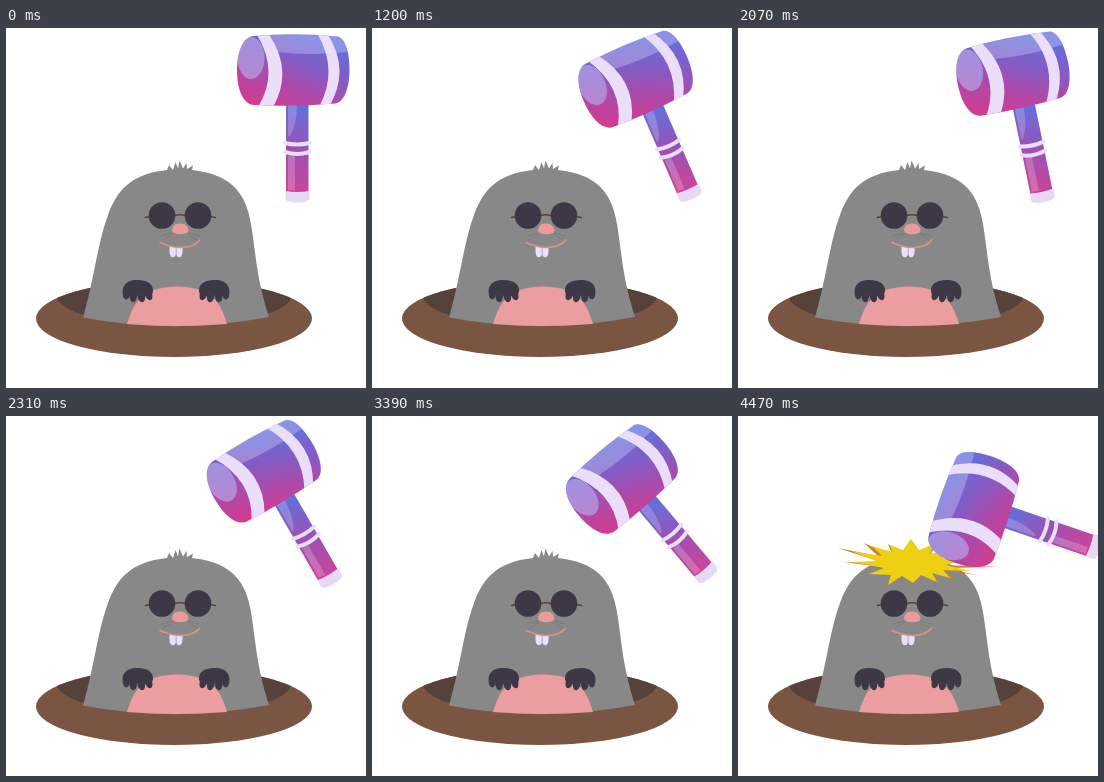
Recreate the animation shown at these times as an HTML page. Size 360 px wide and 360 px high, loop 4.5 s.

```html
<!DOCTYPE html>
<html lang="en">
<head>
<meta charset="utf-8">
<title>Mole and hammer</title>
<style>
  html, body { margin: 0; width: 100%; height: 100%; overflow: hidden; background: #fff; }
  svg { display: block; width: 100vw; height: 100vh; }
  .line { fill: none; stroke-linecap: round; }
</style>
</head>
<body>
<svg viewBox="0 0 360 360">
  <defs>
    <linearGradient id="headTint" gradientUnits="userSpaceOnUse" x1="268" y1="82" x2="298" y2="6">
      <stop offset="0" stop-color="#d03c90"/>
      <stop offset=".3" stop-color="#b248a6"/>
      <stop offset=".65" stop-color="#855bc4"/>
      <stop offset="1" stop-color="#636fdc"/>
    </linearGradient>
    <linearGradient id="gripTint" gradientUnits="userSpaceOnUse" x1="278" y1="160" x2="304" y2="80">
      <stop offset="0" stop-color="#cc4498"/>
      <stop offset=".5" stop-color="#9a52b5"/>
      <stop offset="1" stop-color="#6270dc"/>
    </linearGradient>
    <clipPath id="rim"><ellipse cx="168" cy="290.5" rx="138" ry="38.5"/></clipPath>
    <clipPath id="barrel">
      <path id="barrelShape" d="M247 8 Q290 4.500 332 8.500 C340 11 343.500 26 343.500 42 C343.500 58 339 74 329 75.500 Q288 79 247 77 C236 75 231 60 231 42 C231 25 236 10 247 8Z"/>
    </clipPath>
    <g id="paw" fill="#3d3845">
      <path d="M-15 1 C-14 -7 -8 -9.500 0 -9.500 C9 -9.500 16 -6 15.500 2 C15 7 7 6 0 6 C-8 6 -15 6 -15 1Z"/>
      <ellipse cx="-11.300" cy="4" rx="3.500" ry="6"/>
      <ellipse cx="-4.300" cy="6" rx="3.800" ry="6.800"/>
      <ellipse cx="3.800" cy="6" rx="3.800" ry="6.800" transform="rotate(-10 3.800 6)"/>
      <ellipse cx="11" cy="4.500" rx="3.600" ry="6.500" transform="rotate(-20 11 4.500)"/>
    </g>
  </defs>

  <ellipse cx="168" cy="290.5" rx="138" ry="38.5" fill="#7a5542"/>
  <ellipse cx="168" cy="268" rx="117" ry="30" fill="#56423b" clip-path="url(#rim)"/>

  <g id="mole">
    <path fill="#878887" d="M77 289.500 C88 252 92 214 101 190 C110 163 124 146 161 142 L163 137 L167 142 L169.500 134 L172 140.500 L173.500 132.500 L177 140.500 L180.500 135 L181 141 L187 137.500 L186 142 C224 146 240 164 245 196 C250 226 250 248 263 289 Q168 307 77 289.500Z"/>
    <path fill="#eb9da0" d="M121 296 C127 276 135 259 171 258.500 C207 259 215 276 221 296 Q171 300 121 296Z"/>
    <use href="#paw" x="131.500" y="261.500"/>
    <use href="#paw" transform="translate(208.500 261.500) scale(-1 1)"/>
    <g class="line" stroke="#777674" stroke-width=".7">
      <path d="M166 205 L155 208 M166 207 L157 212 M183 205 L193 208 M183 207 L191 212"/>
    </g>
    <path class="line" stroke="#623d38" stroke-width="1.600" d="M139.500 189.500 L144 188.500 M204 188.500 L209.500 189.500 M168 188 Q174 185.500 180 188"/>
    <circle cx="156" cy="187.500" r="13.300" fill="#3d3845"/>
    <circle cx="192" cy="187.500" r="13.300" fill="#3d3845"/>
    <path fill="#ea9b99" d="M170 196 Q174 195 178 196 C182 198 184 203 181 205 Q174 207.500 168 205 C164 203 167 197 170 196Z"/>
    <path fill="#ebdffb" d="M163.500 219 H169.800 V227 Q168.500 230 165.500 229 Q163 227 163.500 219Z M170.400 219 H176.600 Q177 227 174.500 229 Q171.500 230 170.400 227Z"/>
    <path class="line" stroke="#dd9189" stroke-width="1.500" d="M154 214.500 Q165 219.500 175 219.500 Q189 219 193.500 212"/>
  </g>

  <g id="star" visibility="hidden">
    <path fill="#c8812a" d="M100 132 L140 140 L126 127 L155 140 L150 128 L167 140 L173 124 L180 140 L198 126 L192 141 L225 129 L200 144 L237 142 L204 149 L262 151 L206 152 L239 159 L204 154 L219 164 L194 156 L202 167 L182 157 L174 168 L164 157 L148 170 L155 156 L130 159 L150 152 L106 146 L146 147Z"/>
    <path fill="#edd014" d="M113 135 L144 140 L134 130 L154 136 L152 129 L165 134 L173 123 L181 134 L196 128 L192 138 L219 132 L203 142 L230 144 L208 149 L232 155 L205 154 L212 162 L194 157 L199 166 L183 159 L175 167 L164 160 L150 169 L153 159 L131 158 L146 152 L114 146 L138 145Z"/>
  </g>

  <g id="hammer">
    <rect x="280" y="70" width="22.500" height="95" fill="url(#gripTint)"/>
    <path fill="#fff" opacity=".2" d="M282 76 H291 Q291 96 284 108 H282Z M282 128 H289 V162 H282Z"/>
    <path fill="#e7d9f5" d="M279.500 163 Q291 165 303.500 163 V171 Q302 174.500 291.500 174.500 Q281 174.500 279.500 171Z"/>
    <path class="line" stroke="#eadef8" stroke-width="4" stroke-linecap="butt" d="M279 115 Q291 118 303.500 115 M279 124 Q291 128 303.500 124"/>
    <use href="#barrelShape" fill="url(#headTint)"/>
    <g clip-path="url(#barrel)">
      <path fill="#fff" opacity=".25" d="M262 5 H334 Q340 12 341 24 Q305 28 271 24Z"/>
      <ellipse cx="245" cy="30" rx="13.500" ry="21" fill="#b9b2f0" opacity=".6"/>
      <path fill="#eadef8" d="M250 5 H262 Q288 42 267 79 H252 Q274 44 250 5Z M311 5 H321 Q345 42 323 79 H313 Q333 42 311 5Z"/>
    </g>
  </g>
</svg>
<script>
  const LOOP = 4500, STEP = 30, CYCLE = 1050;
  const FIRST_HIT = 1320, SWING = 480, RETURN = 90, HIT_ANGLE = 71;
  const hammer = document.getElementById("hammer");
  const star = document.getElementById("star");

  // Slow tilt, then a sudden slam, then a quick lift back to rest.
  function angleAt(sinceHit) {
    if (sinceHit >= 0) return HIT_ANGLE * Math.max(0, 1 - sinceHit / RETURN);
    const p = Math.max(0, 1 + sinceHit / SWING);
    return 31 * p + 40 * p ** 20;
  }

  function draw(now) {
    const t = Math.floor((now % LOOP) / STEP) * STEP;
    const nearest = Math.max(0, Math.ceil((t - FIRST_HIT - RETURN) / CYCLE));
    const sinceHit = t - FIRST_HIT - nearest * CYCLE;
    hammer.setAttribute("transform", `rotate(${-angleAt(sinceHit)} 297.7 104)`);
    star.setAttribute("visibility", sinceHit >= 0 && sinceHit < 60 ? "visible" : "hidden");
  }

  const start = performance.now();
  function tick() {
    draw(performance.now() - start);
    requestAnimationFrame(tick);
  }
  tick();
</script>
</body>
</html>
```
